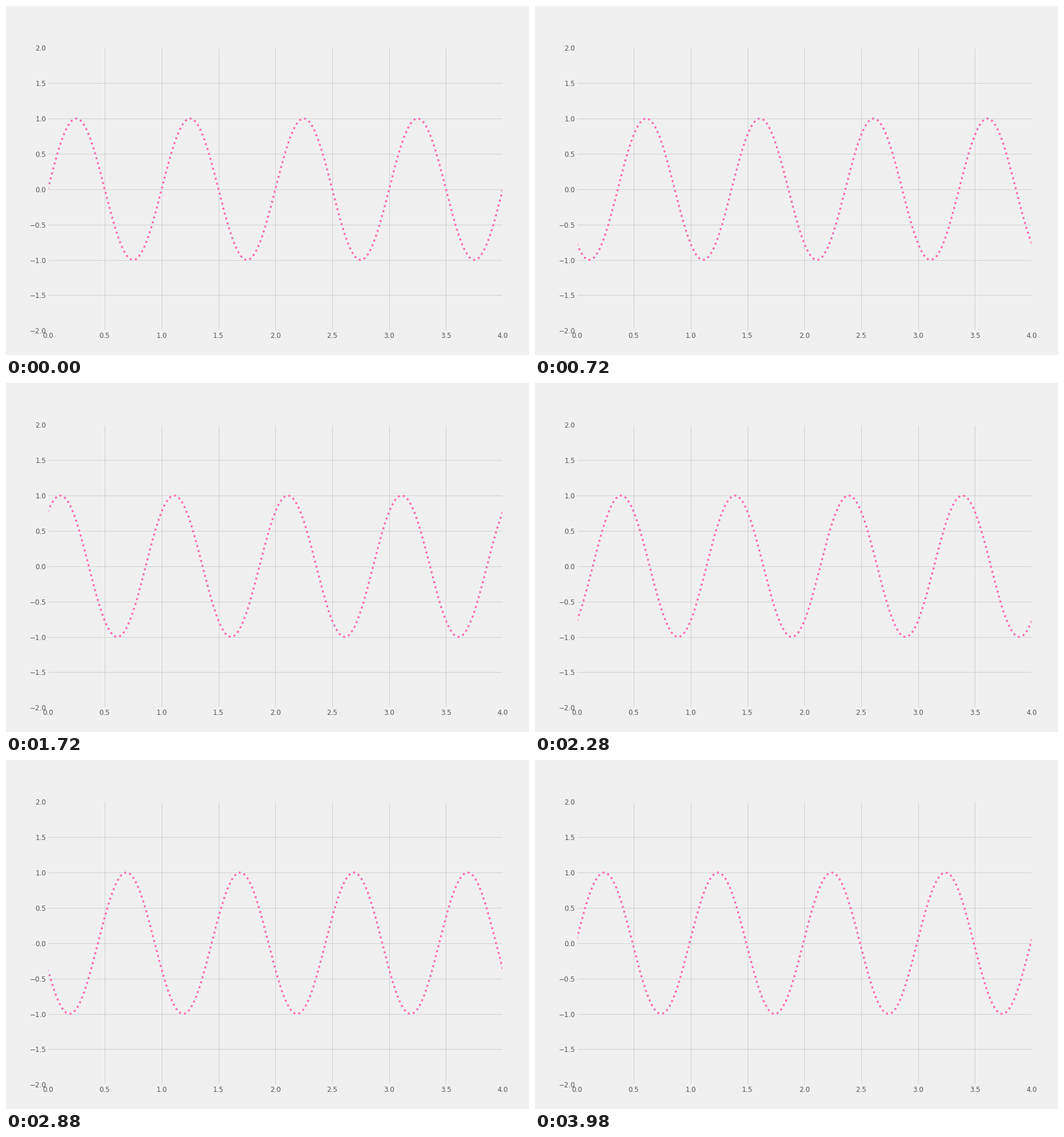
A matplotlib script for the animation above (4000 ms loop, 917x611 px).

```python
import numpy as np
import matplotlib.pyplot as plt
from matplotlib.animation import FuncAnimation

WIDTH, HEIGHT, DPI = 917, 611, 61.1
FRAMES, INTERVAL = 200, 20
SPEED = 0.01  # x units per frame

BACKGROUND = "#f0f0f0"
GRID = "#cbcbcb"
TEXT = "#555555"

plt.rcParams.update({
    "font.family": "DejaVu Sans",
    "font.size": 14,
    "figure.facecolor": BACKGROUND,
    "axes.facecolor": BACKGROUND,
    "axes.edgecolor": BACKGROUND,
    "axes.linewidth": 3,
    "axes.axisbelow": True,
    "axes.grid": True,
    "grid.color": GRID,
    "grid.linewidth": 1,
    "xtick.major.size": 0,
    "ytick.major.size": 0,
    "xtick.color": TEXT,
    "ytick.color": TEXT,
    "toolbar": "None",
})

fig = plt.figure(figsize=(WIDTH / DPI, HEIGHT / DPI), dpi=DPI)
fig.subplots_adjust(left=0.08, right=0.95, bottom=0.07, top=0.88)
ax = fig.add_subplot(xlim=(0, 4), ylim=(-2, 2))
ax.set_xticks(np.arange(0, 4.1, 0.5))
ax.set_yticks(np.arange(-2, 2.1, 0.5))

x = np.linspace(0, 4, 1000)


def wave(i):
    return np.sin(2 * np.pi * (x - SPEED * i))


line, = ax.plot(x, wave(0), ":", color="hotpink", lw=4)


def update(i):
    line.set_ydata(wave(i))
    return line,


anim = FuncAnimation(fig, update, frames=FRAMES, interval=INTERVAL,
                     repeat=True, repeat_delay=0, blit=False)
plt.show()
```
